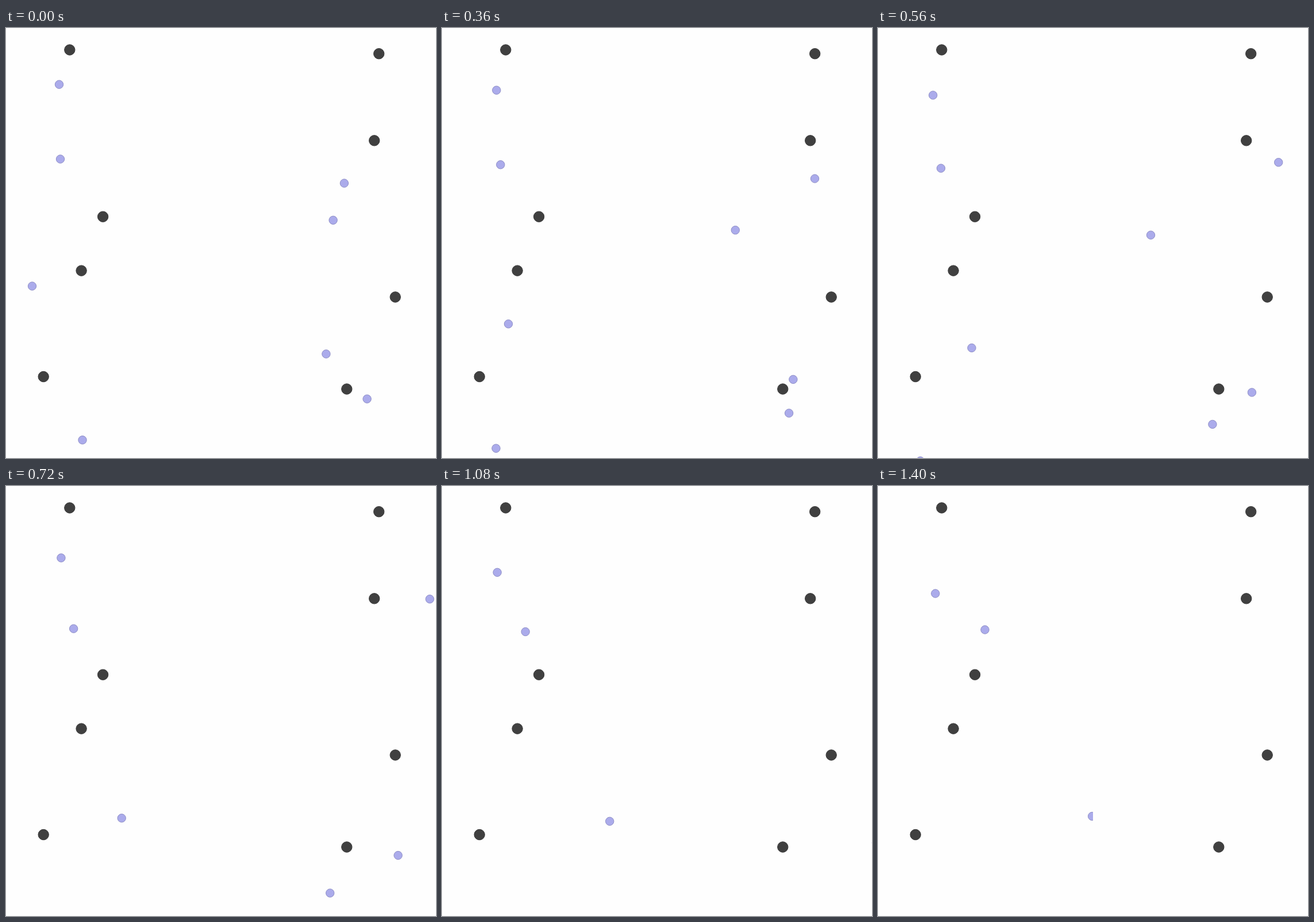
Animation of 748x748 px, one loop 1.44 s. Source, as an HTML page with a canvas:

```html
<!DOCTYPE html>
<html lang="en">
<head>
<meta charset="utf-8">
<title>Drifting particles</title>
<style>
  html, body { margin: 0; width: 100%; height: 100%; overflow: hidden; background: #fefefe; }
  canvas { display: block; width: 748px; height: 748px; }
</style>
</head>
<body>
<canvas id="stage" width="748" height="748"></canvas>
<script>
const SIZE = 748, HALF = SIZE / 2;
const LOOP = 1440, STEP = 40, RISE = 106;
const ANCHOR = { radius: 9.2, fill: '#404040', stroke: '#3a3a3a' };
const MOVER = { radius: 7.2, fill: '#ababeb', stroke: '#8e8ec6' };
const ctx = document.getElementById('stage').getContext('2d');

// Particles start at rest and approach cruising speed exponentially.
const travel = t => t - RISE * (1 - Math.exp(-t / RISE));
const beats = [0, 360, 560, 880, 1400].map(travel);

// Each mover follows the lowest-degree polynomial through its key points,
// one per beat; leaving the panel needs no extra points.
const panels = [
  {
    left: 0,
    anchors: [[110.8, 38], [168.6, 328.2], [131.1, 422.1], [65.2, 606.5]],
    movers: [
      { keys: [[92.5, 98.2], [94.8, 108.2], [95.7, 116.9], [95.9, 134.8], [99.8, 187]] },
      { keys: [[94.5, 228], [101.8, 237.8], [109.5, 244], [128, 251.4], [186, 250]] },
      { keys: [[45.5, 449], [115.5, 514.8], [163, 556.5], [240.6, 586.5], [372.6, 574.5]] },
      { keys: [[133, 716.7], [94, 731.2], [73.6, 753]] }
    ]
  },
  {
    left: HALF,
    anchors: [[648.7, 44.7], [640.7, 195.8], [677.2, 468], [592.8, 628]],
    movers: [
      { keys: [[588.4, 270], [648.5, 262], [696.7, 233.7]] },
      { keys: [[569.1, 334.3], [510.3, 351.6], [474.5, 360.2]], until: 720 },
      { keys: [[556.9, 567], [610.9, 611.3], [650.4, 633.9], [714.1, 640.6]] },
      { keys: [[628.1, 645.2], [603.6, 670], [581.9, 689.4], [545.9, 731.5]] }
    ]
  }
];

// Neville's scheme: blend neighbouring points until one remains.
function along(keys, s) {
  let points = keys;
  for (let span = 1; span < keys.length; span++) {
    points = points.slice(1).map((next, i) => {
      const u = (s - beats[i]) / (beats[i + span] - beats[i]);
      return next.map((value, axis) => points[i][axis] * (1 - u) + value * u);
    });
  }
  return points[0];
}

function dot([x, y], { radius, fill, stroke }) {
  ctx.beginPath();
  ctx.arc(x, y, radius, 0, 2 * Math.PI);
  ctx.fillStyle = fill;
  ctx.fill();
  ctx.strokeStyle = stroke;
  ctx.stroke();
}

function drawPanel({ left, anchors, movers }, t) {
  const s = travel(t);
  ctx.save();
  ctx.beginPath();
  ctx.rect(left, 0, HALF, SIZE);
  ctx.clip();
  for (const center of anchors) dot(center, ANCHOR);
  for (const { keys, until = LOOP } of movers) {
    if (t < until) dot(along(keys, s), MOVER);
  }
  ctx.restore();
}

function render(elapsed) {
  const t = Math.floor(elapsed % LOOP / STEP) * STEP;
  ctx.fillStyle = '#fefefe';
  ctx.fillRect(0, 0, SIZE, SIZE);
  for (const panel of panels) drawPanel(panel, t);
}

let start;
function tick(now) {
  start ??= now;
  render(Math.max(0, now - start));
  requestAnimationFrame(tick);
}
render(0);
requestAnimationFrame(tick);
</script>
</body>
</html>
```
